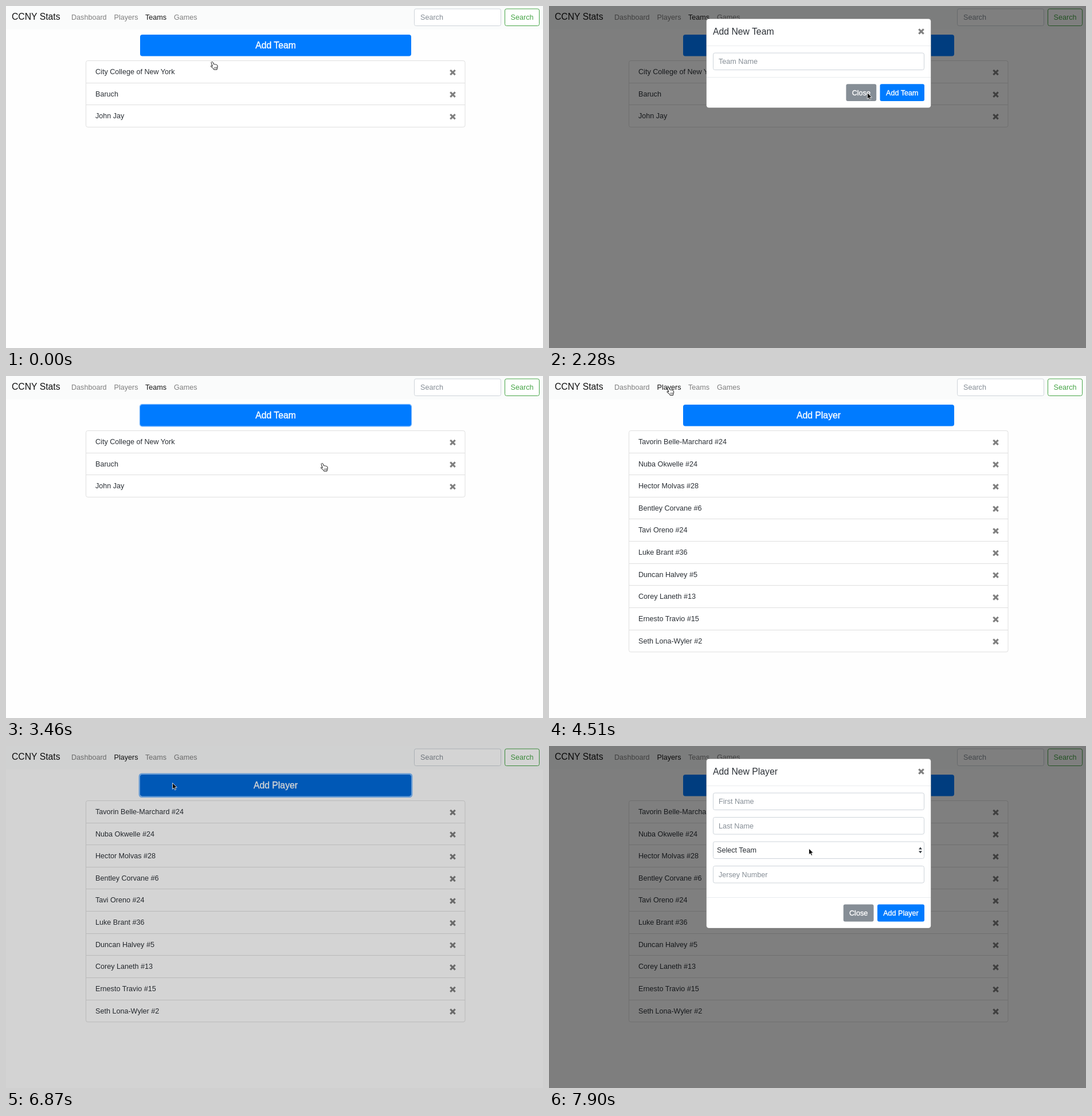
Recreate the animation shown at these times as an HTML page. Size 937 px wide and 597 px high, loop 8 s.

```html
<!DOCTYPE html>
<html lang="en">
<head>
<meta charset="utf-8">
<title>Team manager</title>
<style>
html, body { margin: 0; width: 100%; height: 100%; overflow: hidden; background: #fefefe; }
svg { display: block; width: 937px; height: 597px; }
text { font: 12.6px "Liberation Sans", Arial, sans-serif; fill: #2b3036; white-space: pre; }
.big { font-size: 15.76px; }
.brand { fill: #111; }
.nav { fill: #7f7f7f; }
.on { fill: #151515; }
.hint { fill: #868e96; }
.white { fill: #fff; stroke: #fff; stroke-width: .35; text-anchor: middle; }
.field { fill: #fff; stroke: #ced4da; }
.list { fill: #fff; stroke: #dfdfdf; }
.x { stroke: #7f7f7f; stroke-width: 3.1; fill: none; }
</style>
</head>
<body>
<svg id="stage" viewBox="0 0 937 597"></svg>
<script>
const LOOP = 8000, PITCH = 38.62;
const BLUE = '#007bff', GRAY = '#868e96';

const teams = ['City College of New York', 'Baruch', 'John Jay'];
const players = ['Tavorin Belle-Marchard #24', 'Nuba Okwelle #24', 'Hector Molvas #28',
  'Bentley Corvane #6', 'Tavi Oreno #24', 'Luke Brant #36', 'Duncan Halvey #5',
  'Corey Laneth #13', 'Ernesto Travio #15', 'Seth Lona-Wyler #2'];

// Moments at which the screen refreshes
const steps = [0, 140, 290, 590, 740, 890, 1040, 1190, 1400, 1550, 1690, 1840, 1990,
  2280, 2430, 2580, 3020, 3170, 3320, 3460, 3610, 3910, 4060, 4210, 4360, 4510,
  4950, 5100, 5250, 5400, 5540, 5690, 5840, 5980, 6130, 6280, 6420, 6570,
  6870, 7020, 7170, 7320, 7470, 7620, 7770, 7900];

// Pointer path: time, x, y, shape from that time on
const path = [
  [0, 359.5, 97.5, 'hand'], [290, 362, 64, 'hand'], [590, 362, 64, 'hand'],
  [740, 365, 69, 'beam'], [1040, 365, 69, 'beam'], [1550, 474, 88, 'beam'],
  [1690, 483, 95, 'beam'], [1840, 494, 122, 'arrow'], [1990, 513, 153, 'arrow'],
  [2280, 555.5, 151.5, 'arrow'], [3320, 555.5, 151.5, 'arrow'],
  [3460, 551.5, 152.5, 'hand'], [3610, 551.5, 152.5, 'hand'],
  [4360, 208, 20, 'hand'], [4510, 208, 20, 'hand'], [5400, 255, 298, 'hand'],
  [5980, 263, 218.5, 'hand'], [6570, 287, 64, 'hand'], [6870, 290.5, 64.5, 'arrow'],
  [7170, 290.5, 64.5, 'arrow'], [7900, 453.5, 179, 'arrow']];

const rect = (x, y, w, h, r, attrs) =>
  `<rect x="${x}" y="${y}" width="${w}" height="${h}" rx="${r}" ${attrs}/>`;
const text = (x, y, s, cls = '') => `<text x="${x}" y="${y}" class="${cls}">${s}</text>`;
const line = (x, y, w, color) => `<path d="M${x} ${y}h${w}" stroke="${color}"/>`;
const cross = (x, y) =>
  `<path class="x" d="M${x - 4.2} ${y - 4.2}l8.4 8.4m0-8.4l-8.4 8.4"/>`;

function page(id, active, label, rows) {
  const nav = [['Dashboard', 114], ['Players', 188.5], ['Teams', 243], ['Games', 293]];
  return `<g id="${id}">` +
    nav.map(([s, x]) => text(x, 23.6, s, s === active ? 'on' : 'nav')).join('') +
    text(470.5, 73.5, label, 'white big') +
    rect(139.5, 95.5, 661.5, rows.length * PITCH, 3.2, 'class="list"') +
    rows.map((s, i) => {
      const y = i * PITCH;
      return (i ? line(140, Math.round(95 + y) + .5, 661, '#dfdfdf') : '') +
        text(156, 119 + y, s) + cross(779.5, 116 + y);
    }).join('') + '</g>';
}

function field(y, hint) {
  return rect(286.5, y, 368, 29.5, 3, 'class="field"') + text(296, y + 19, hint, 'hint');
}

function modal(id, what, h, body, closeX, addX) {
  const foot = 22 + h - 41.7, label = foot + 19.2;
  return `<g id="${id}">` +
    rect(274.5, 22.3, 392, h - .6, 4.5, 'fill="#fff" stroke="#000" stroke-opacity=".2"') +
    text(286, 50.3, 'Add New ' + what, 'big') + cross(649.5, 44.5) +
    line(275, 69.5, 391, '#e9ecef') + body +
    line(275, Math.floor(foot - 12.3) + .5, 391, '#e9ecef') +
    rect(closeX, foot, 52.8, 29.8, 3, `fill="${GRAY}"`) +
    rect(closeX, foot, 52.8, 29.8, 3, 'fill="#727b84" class="over" opacity="0"') +
    text(closeX + 26.4, label, 'Close', 'white') +
    rect(addX, foot, 655 - addX, 29.8, 3, `fill="${BLUE}"`) +
    text((addX + 655) / 2, label, 'Add ' + what, 'white') + '</g>';
}

const select = rect(286.5, 167, 368, 29.5, 3, 'class="field"') + text(293, 186, 'Select Team') +
  '<path d="M645 180.6l3-4 3 4zM645 183.2l3 4 3-4z" fill="#343a40"/>';

const hand = `<g id="hand"><path fill="#fff" stroke="#111" stroke-width="1"
  d="M-.8 .3C.2-.6 1.3.2 1.7 1.1L3 4.4c.7-.7 1.7-.5 2 .2 .8-.6 1.8-.3 2.1.5
  1-.4 2 .1 2.2 1.1l.4 2.4-.9 2.8-.2 2.1H3.2L2 11.3-1.8 8.4c-.8-1 .3-2 1.4-1.3l1.3.8L-1.3 2c-.3-.7-.1-1.3.5-1.7z"/>
  <path d="M4 9.2l.3 2.4M5.9 9l.2 2.4M7.7 8.8l.1 2.4" stroke="#111" stroke-width=".7"/></g>`;
const arrow = `<path id="arrow" fill="#000" stroke="#fff" stroke-width=".8"
  d="M0 0V10.8L2.5 8.5 4.2 12.3 6 11.5 4.4 7.8H7.8z"/>`;
const beamShape = 'M-3-6.5Q0-6.5 0-4.5Q0-6.5 3-6.5M0-5V5M-3 6.5Q0 6.5 0 4.5Q0 6.5 3 6.5M-1.5 2h3';
const beam = `<g id="beam" fill="none"><path d="${beamShape}" stroke="#ddd" stroke-width="2" opacity=".6"/>
  <path d="${beamShape}" stroke="#111" stroke-width="1"/></g>`;

const stage = document.getElementById('stage');
stage.innerHTML =
  rect(0, 0, 937, 597, 0, 'fill="#fefefe"') + rect(0, 0, 937, 41, 0, 'fill="#fafbfb"') +
  text(10, 24.3, 'CCNY Stats', 'big brand') +
  rect(712.5, 5, 151, 29.5, 3, 'class="field"') + text(723, 23.6, 'Search', 'hint') +
  rect(870.5, 5, 60, 29.5, 3, 'fill="#fff" stroke="#46a546"') +
  '<text x="900.5" y="23.6" text-anchor="middle" style="fill:#46a546">Search</text>' +
  rect(234, 50, 473, 37.5, 4, `id="ring" fill="none" stroke="${BLUE}" stroke-opacity=".5"`) +
  rect(234, 50, 473, 37.5, 3.9, `fill="${BLUE}"`) +
  rect(234, 50, 473, 37.5, 3.9, 'id="hover" fill="#0069d9"') +
  page('teams', 'Teams', 'Add Team', teams) +
  page('players', 'Players', 'Add Player', players) +
  rect(0, 0, 937, 597, 0, 'id="dim"') +
  modal('teamBox', 'Team', 156, field(82, 'Team Name'), 518.4, 577.5) +
  modal('playerBox', 'Player', 296.3, field(82, 'First Name') + field(124.5, 'Last Name') +
    select + field(209.5, 'Jersey Number'), 513.7, 573) +
  `<g id="pointer">${hand}${arrow}${beam}</g>`;

const el = id => stage.querySelector('#' + id);
const set = (node, name, value) => node.setAttribute(name, value);
const show = (id, on) => set(el(id), 'display', on ? 'inline' : 'none');
const easeOut = p => 1 - Math.pow(1 - p, 1.9);

function drawModal(id, h, alpha, enter, leave) {
  show(id, alpha > 0);
  set(el(id), 'opacity', alpha);
  const away = 1 - easeOut(enter) + easeOut(leave);
  set(el(id), 'transform', `translate(0 ${-.25 * h * away})`);
}

function drawPointer(t) {
  let i = path.length - 1;
  while (path[i][0] > t) i--;
  const a = path[i], b = path[i + 1] || a;
  const p = b === a ? 0 : (t - a[0]) / (b[0] - a[0]);
  const x = a[1] + (b[1] - a[1]) * p, y = a[2] + (b[2] - a[2]) * p;
  set(el('pointer'), 'transform', `translate(${x} ${y})`);
  for (const kind of ['hand', 'arrow', 'beam']) show(kind, kind === a[3]);
}

function draw(t) {
  const fade = (start, span = 150) => Math.min(1, Math.max(0, (t - start) / span));
  const ring = fade(520) - fade(1050) + fade(3385) - fade(4360) + fade(6720) - fade(7270);
  const grow = 2.4 * ring, ringBox = el('ring');
  set(ringBox, 'stroke-width', grow);
  set(ringBox, 'x', 234 - grow / 2);
  set(ringBox, 'y', 50 - grow / 2);
  set(ringBox, 'width', 473 + grow);
  set(ringBox, 'height', 37.5 + grow);
  set(el('hover'), 'opacity', fade(90) - fade(590) + fade(6420) - fade(6860));
  set(el('dim'), 'opacity', .5 * (fade(603) - fade(3235) + fade(6819)));
  show('teams', t < 4510);
  show('players', t >= 4510);
  set(stage.querySelector('#teamBox .over'), 'opacity', fade(2330));
  drawModal('teamBox', 156, fade(753) - fade(3085), fade(753, 300), fade(3085, 300));
  drawModal('playerBox', 296, fade(6969), fade(6969, 300), 0);
  drawPointer(t);
}

let last = -1;
const origin = performance.now();
function tick() {
  const t = (performance.now() - origin) % LOOP;
  const now = steps.filter(s => s <= t).pop() || 0;
  if (now !== last) draw(last = now);
  requestAnimationFrame(tick);
}
tick();
</script>
</body>
</html>
```
